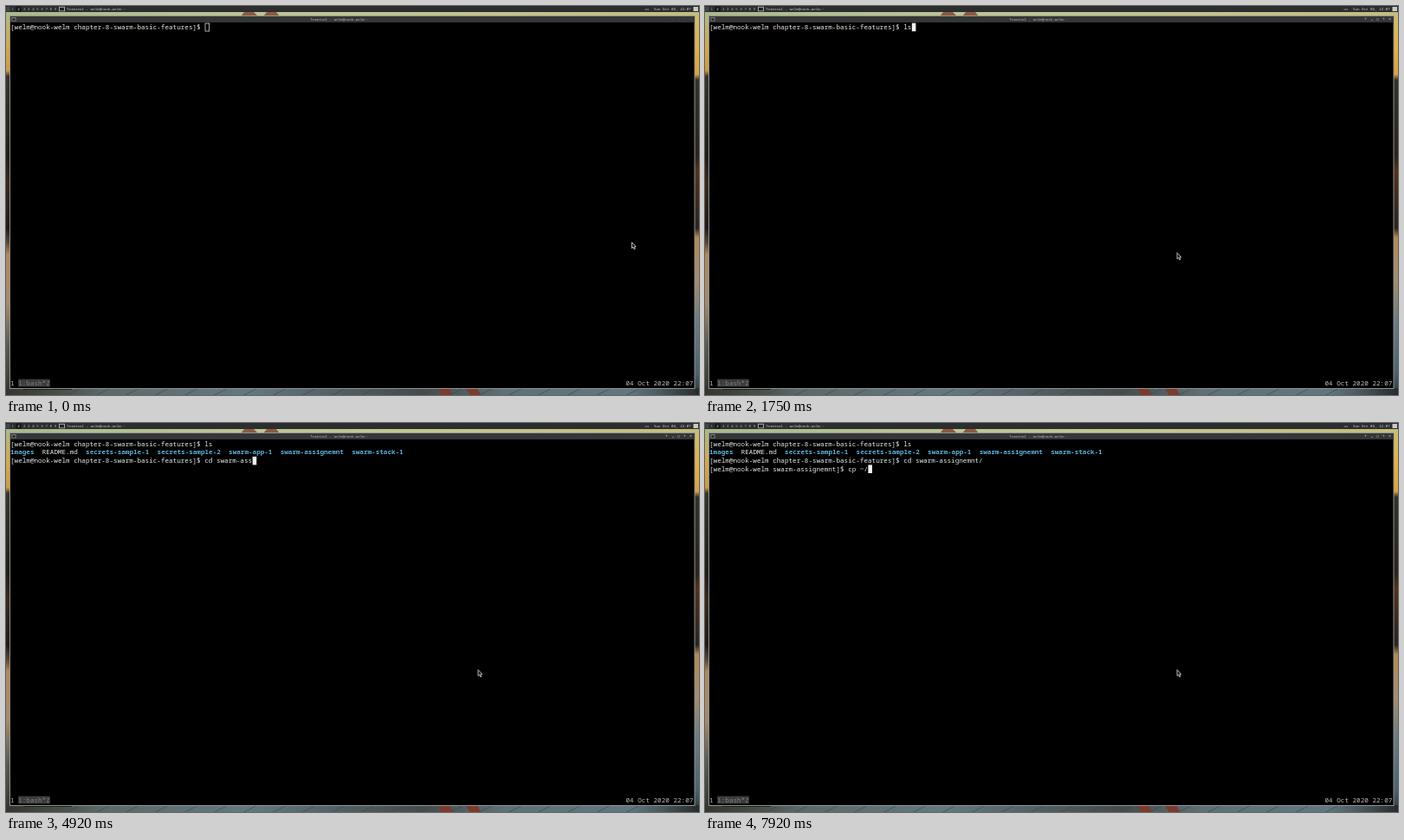
An HTML page with a canvas for the animation above (8000 ms loop, 800 by 450 pixels).

```html
<!DOCTYPE html>
<html lang="en">
<head>
<meta charset="utf-8">
<title>Terminal session</title>
<style>
  html, body { margin: 0; width: 100%; height: 100%; overflow: hidden; background: #000; }
  canvas { display: block; width: 800px; height: 450px; }
</style>
</head>
<body>
<canvas id="stage" width="800" height="450"></canvas>
<script>
const ctx = document.getElementById('stage').getContext('2d');
const LOOP = 8000;
const CELL = { x: 5, y: 19.7, w: 4.584, h: 9.58 };
const MONO = '"Noto Sans Mono", monospace';
const TERM_FONT = `7.64px ${MONO}`;
const SMALL_FONT = `4.2px ${MONO}`;
const WHITE = '#e8e8e8';
const BLUE = '#5fafd7';

const USER = '[welm@nook-welm ';
const PROMPT = USER + 'chapter-8-swarm-basic-features]$ ';
const PROMPT_SUB = USER + 'swarm-assignemnt]$ ';
const WINDOW_TITLE = 'Terminal - welm@nook-welm:~';
const FILES = ['images', 'README.md', 'secrets-sample-1', 'secrets-sample-2',
  'swarm-app-1', 'swarm-assignemnt', 'swarm-stack-1'];

// Each step: [time, value from then on]
const FOCUS_AT = 420;
const CURSOR_FILL_AT = 500;
const LIST_AT = 1830;
const ENTER_AT = 5420;
const LS = [[0, ''], [1580, 'l'], [1670, 'ls']];
const CD = [[0, ''], [2920, 'c'], [3080, 'cd'], [3170, 'cd '], [3420, 'cd s'],
  [3580, 'cd sw'], [3670, 'cd swarm-'], [4500, 'cd swarm-a'], [4670, 'cd swarm-as'],
  [4830, 'cd swarm-ass'], [5080, 'cd swarm-assignemnt/']];
const CP = [[0, ''], [6330, 'c'], [6420, 'cp'], [6670, 'cp '], [6920, 'cp ~'],
  [7000, 'cp ~/'], [7330, 'cp ~'], [7580, 'cp '], [7750, 'cp ~'], [7830, 'cp ~/']];
const POINTER = [[0, [722.5, 273.3]], [80, [660, 278]], [170, [580, 284]], [250, [545, 285.5]]];

const valueAt = (steps, t) => steps.filter(([start]) => start <= t).pop()[1];

function rect(x, y, w, h, color) {
  ctx.fillStyle = color;
  ctx.fillRect(x, y, w, h);
}

function shade(x, y, w, h, stops, across = false) {
  const g = ctx.createLinearGradient(x, y, across ? x + w : x, across ? y : y + h);
  stops.forEach(([at, color]) => g.addColorStop(at, color));
  rect(x, y, w, h, g);
}

function label(text, x, y, color, font = SMALL_FONT) {
  ctx.font = font;
  ctx.fillStyle = color;
  ctx.fillText(text, x, y);
}

function termText(text, col, row, color = WHITE, bold = false) {
  label(text, CELL.x + col * CELL.w, CELL.y + row * CELL.h + 7.2, color,
    (bold ? 'bold ' : '') + TERM_FONT);
}

function shape(points, fill, stroke, width = 1) {
  ctx.beginPath();
  points.forEach(([x, y]) => ctx.lineTo(x, y));
  ctx.closePath();
  ctx.fillStyle = fill;
  ctx.fill();
  if (stroke) {
    ctx.strokeStyle = stroke;
    ctx.lineWidth = width;
    ctx.stroke();
  }
}

function drawWallpaper() {
  shade(0, 7, 800, 6, [[0, '#a9b98d'], [0.35, '#bdc594'], [0.65, '#c2c68f'], [1, '#c5bd7c']], true);
  shape([[271, 12], [275, 7], [286, 7], [291, 12]], '#8c5a42');
  shape([[297, 12], [301, 7], [312, 7], [316, 12]], '#8c5a42');
  shade(0, 11, 5, 439, [[0, '#b3b780'], [0.08, '#d3a94e'], [0.145, '#d09a42'], [0.16, '#39352b'],
    [0.37, '#211d18'], [0.44, '#3a2a1c'], [0.56, '#1e1b18'], [0.6, '#5c4a36'],
    [0.63, '#b08a5c'], [0.76, '#a58a68'], [0.87, '#5c5a55'], [1, '#34342f']]);
  shade(795, 11, 5, 439, [[0, '#cfbd70'], [0.08, '#e2b24a'], [0.155, '#d9a445'], [0.17, '#34322c'],
    [0.37, '#2a241e'], [0.41, '#51341f'], [0.56, '#292521'], [0.585, '#b58a55'],
    [0.7, '#a28e70'], [0.8, '#6d7d85'], [0.94, '#4d6470'], [1, '#2f393c']]);
  shade(0, 442, 800, 8, [[0, '#34352f'], [0.08, '#49504a'], [0.14, '#5a6a6b'], [0.35, '#637880'],
    [0.5, '#4e5c61'], [0.6, '#444b4b'], [0.72, '#5d7177'], [0.9, '#617780'],
    [0.95, '#46555a'], [1, '#252b2c']], true);
  for (let x = 70; x < 750; x += 34) {
    shape([[x, 450], [x + 16, 442], [x + 17, 442], [x + 1.5, 450]], '#3d494d');
  }
  rect(20, 442, 56, 2, '#1c1d1a');
  shape([[499, 442], [511, 442], [516, 450], [503, 450]], '#7b3a2b');
  shape([[530, 442], [544, 442], [548, 450], [536, 450]], '#7b3a2b');
}

function drawTopBar() {
  rect(0, 0, 800, 7, '#2b2d2e');
  label('1', 6.5, 4.9, '#a0a0a0');
  rect(0.5, 1, 4, 5, '#44484a');
  rect(11.5, 0.5, 6, 6, '#151515');
  label('2', 13.3, 4.9, '#f0f0f0');
  for (let n = 2; n <= 9; n++) label(String(n), 20 + (n - 2) * 5.1, 4.9, '#b4b4b4');
  rect(61, 0.8, 7, 5.4, '#a8a8a8');
  rect(62, 1.8, 5, 3.6, '#222');
  label(WINDOW_TITLE, 70, 4.9, '#c4c4c4');
  label('us', 737.5, 4.9, '#b8b8b8');
  label('Sun Oct 04, 22:07', 748, 4.9, '#d0d0d0');
  rect(793.5, 1, 5.5, 5, '#c9c9c9');
}

function drawWindow(focused) {
  rect(4, 11, 791.5, 432, '#8f9290');
  rect(5, 12, 789.5, 430, '#000');
  rect(5, 12, 789.5, 7, '#343637');
  rect(6.5, 13.2, 5, 4.2, '#929292');
  rect(7.3, 14.2, 3.4, 2.5, '#202020');
  label(WINDOW_TITLE, 351, 17, '#b4b4b4');
  ['+', '⌄', '□', '+', '×'].forEach((mark, i) =>
    label(mark, 761 + i * 7, 17, focused ? '#c6c6c6' : '#4b4d4e', `5px ${MONO}`));
}

function drawStatus() {
  termText('1', 0, 43, '#bdbdbd');
  rect(CELL.x + 2 * CELL.w, CELL.y + 43 * CELL.h, 8 * CELL.w, CELL.h - 0.8, '#3c3c3c');
  termText('1:bash*Z', 2, 43, '#808080');
  termText('04 Oct 2020 22:07', 155, 43, '#bdbdbd');
}

function drawCursor(col, row, filled) {
  const x = CELL.x + col * CELL.w;
  const y = CELL.y + row * CELL.h;
  if (filled) {
    rect(x, y, CELL.w, CELL.h, '#f2f2f2');
  } else {
    ctx.strokeStyle = '#d8d8d8';
    ctx.lineWidth = 0.8;
    ctx.strokeRect(x + 0.4, y + 0.4, CELL.w, CELL.h - 0.6);
  }
}

function drawSession(t) {
  const lines = [[0, PROMPT + valueAt(LS, t)]];
  if (t >= LIST_AT) {
    let col = 0;
    for (const file of FILES) {
      const isFolder = !file.includes('.');
      termText(file, col, 1, isFolder ? BLUE : WHITE, isFolder);
      col += file.length + 2;
    }
    lines.push([2, PROMPT + valueAt(CD, t)]);
  }
  if (t >= ENTER_AT) lines.push([3, PROMPT_SUB + valueAt(CP, t)]);
  lines.forEach(([row, text]) => termText(text, 0, row));
  const [row, text] = lines[lines.length - 1];
  drawCursor(text.length, row, t >= CURSOR_FILL_AT);
}

function drawPointer([x, y]) {
  const outline = [[0, 0], [0, 7], [1.6, 5.6], [2.7, 8.2], [3.8, 7.7], [2.8, 5.2], [4.7, 5]];
  shape(outline.map(([dx, dy]) => [x + dx, y + dy]), '#111', '#dedede', 0.8);
}

function draw(t) {
  drawWallpaper();
  drawTopBar();
  drawWindow(t >= FOCUS_AT);
  drawSession(t);
  drawStatus();
  drawPointer(valueAt(POINTER, t));
}

const start = performance.now();
function tick() {
  draw((performance.now() - start) % LOOP);
  requestAnimationFrame(tick);
}
tick();
</script>
</body>
</html>
```
